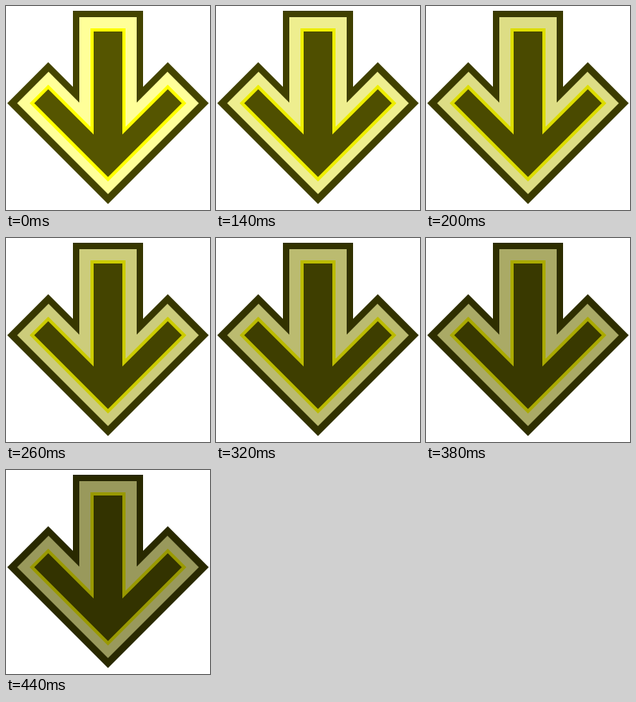
An HTML page without scripts that plays this animation: 256x256 px, repeating every 0.88 s.

```html
<!DOCTYPE html>
<html lang="en">
<head>
<meta charset="utf-8">
<title>Down arrow</title>
<style>
  html, body { margin: 0; width: 100%; height: 100%; overflow: hidden; background: #fff; }
  svg { display: block; width: 100vw; height: 100vh; }

  .rim { --fill: #440; --fill-dim: #292900; }
  .band { --fill: #ff9; --fill-dim: #99995c; }
  .core {
    --fill: #550; --fill-dim: #330;
    --line: #ff0; --line-dim: #990;
    stroke-width: 4;
  }
  path { animation: dim 880ms infinite; }

  /* Hold 140 ms, then six 60 ms steps down, then hold the dim state */
  @keyframes dim {
    0% { fill: var(--fill); stroke: var(--line, none); }
    15.909% {
      fill: var(--fill); stroke: var(--line, none);
      animation-timing-function: steps(6, jump-start);
    }
    56.818%, 100% { fill: var(--fill-dim); stroke: var(--line-dim, none); }
  }
</style>
</head>
<body>
<svg viewBox="0 0 256 256">
  <path class="rim" d="M84 6H172V101.6L203 70.6L254.4 122L128 248.4L1.6 122L53 70.6L84 101.6Z"/>
  <path class="band" d="M92 14H164V121.2L202.6 82.6L242 122L128 236L14 122L53.4 82.6L92 121.2Z"/>
  <path class="core" d="M108 30H148V156.5L203 101.5L223.5 122L128 217.5L32.5 122L53 101.5L108 156.5Z"/>
</svg>
</body>
</html>
```
